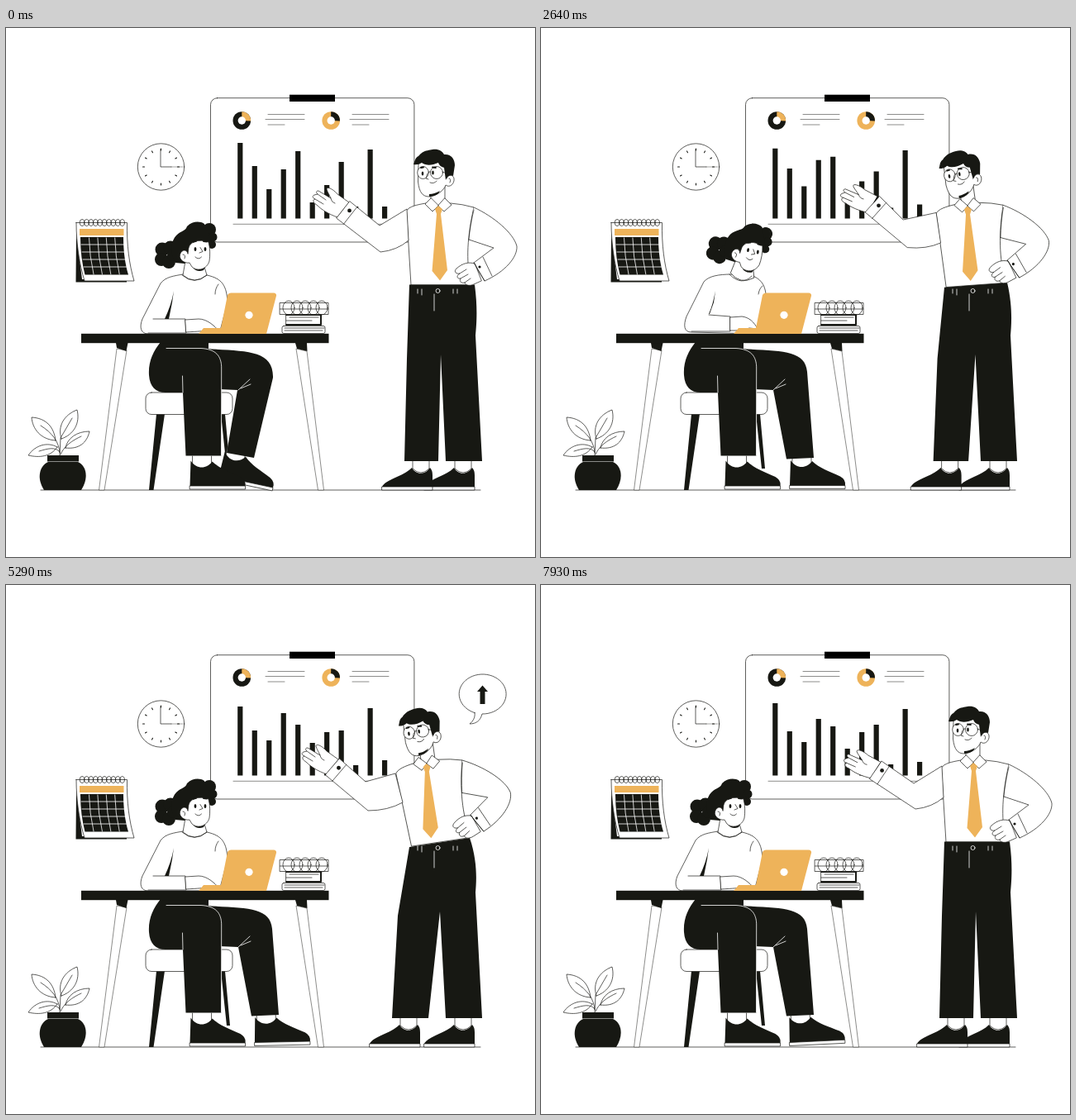
Recreate the animation shown at these times as an HTML page. Size 640 by 640 pixels, loop 8 s.

```html
<!DOCTYPE html>
<html lang="en">
<head>
<meta charset="utf-8">
<title>Office presentation</title>
<style>
html, body { margin: 0; height: 100%; overflow: hidden; background: #fff; }
svg { display: block; width: 100vw; height: 100vh; }
.line { fill: none; stroke: #1a1b17; stroke-width: .7; stroke-linejoin: round; stroke-linecap: round; }
.paper { fill: #fff; stroke: #1a1b17; stroke-width: .7; stroke-linejoin: round; stroke-linecap: round; }
.faint { fill: #fff; stroke: #1a1b17; stroke-width: .5; }
.ink { fill: #171813; }
.pure { fill: #000; }
.gold { fill: #eeb35a; }
.chalk { fill: none; stroke: #fff; stroke-width: .8; stroke-linecap: round; }
.brow { fill: none; stroke: #171813; stroke-width: 1.8; stroke-linecap: round; }
</style>
</head>
<body>
<svg id="stage" viewBox="0 0 640 640"></svg>
<script>
const LOOP = 8000;
const KEY_TIMES = [0, 2000, 3210, 4290, 5290, 6500, 7930];
const stage = document.getElementById('stage');

// Markup helpers
const path = (cls, d, id = '') => `<path class="${cls}" d="${d}"${id && ` id="${id}"`}/>`;
const disc = (cls, x, y, rx, ry = rx) => `<ellipse class="${cls}" cx="${x}" cy="${y}" rx="${rx}" ry="${ry}"/>`;
const box = (cls, x, y, w, h, r = 0) => `<rect class="${cls}" x="${x}" y="${y}" width="${w}" height="${h}" rx="${r}"/>`;
const group = (id, content) => `<g id="${id}">${content}</g>`;
const repeat = (n, draw) => Array.from({ length: n }, (_, i) => draw(i)).join('');

function plant() {
  return path('paper', 'M60 499C42 498 32 485 31 471C48 472 58 482 60 499ZM67 497C62 482 70 468 86 462C90 478 82 492 67 497ZM62 507C50 500 35 505 27 517C40 520 54 519 62 507ZM72 508C74 496 86 488 101 488C98 502 88 510 72 508Z')
    + path('line', 'M65 517L66 496L80 472M65 514C64 500 56 490 42 481M65 513C60 506 50 509 40 512M66 516C70 506 80 499 91 494')
    + box('ink', 50, 517, 38, 7.5)
    + path('ink', 'M51 525C40 530 37 545 46 559H91C100 545 98 530 87 525Z');
}

function clock() {
  const tick = i => {
    const a = i * Math.PI / 6, x = Math.sin(a), y = Math.cos(a);
    return `M${187.5 + 20 * x} ${168 + 20 * y}L${187.5 + 22 * x} ${168 + 22 * y}`;
  };
  return disc('paper', 187.5, 168, 28.2)
    + `<path class="line" style="stroke-width:1.1" d="${repeat(12, tick)}"/>`
    + path('line', 'M187 147V168H200')
    + '<path class="line" style="stroke-width:.4" d="M200 168H214"/>';
}

function calendar() {
  return path('ink', 'M85 248L92 304L146 305.5V307.5H84.5Z')
    + path('paper', 'M85 235.5H146.5C146 262 149 286 155 306H95C89 286 85 262 85 235.5Z')
    + box('gold', 89, 243, 53.5, 8)
    + path('ink', 'M90 253H142C142 270 144 285 148 298.5H95.5C92 285 90 270 90 253Z')
    + path('chalk', repeat(4, i => `M${100.5 + i * 10.4} 254Q${101 + i * 10.4} 276 ${106 + i * 10.4} 298M${91 + i} ${262 + i * 9}H${143 + i}`))
    + repeat(10, i => disc('line', 92 + i * 5.4, 235.5, 2.8, 4));
}

function donut(x, base, slice) {
  return disc(base, x, 112, 10.8)
    + path(slice, `M${x} 112V101.2A10.8 10.8 0 0 1 ${x + 10.8} 112.6Z`)
    + `<circle cx="${x}" cy="112" r="4.7" fill="#fff"/>`;
}

function board() {
  const notes = x => `M${x + 3} 104.5H${x + 47}M${x} 110.5H${x + 47}M${x + 3} 117H${x + 23}`;
  return box('paper', 247.5, 84.7, 246.4, 174.3, 8)
    + box('pure', 343, 80.7, 55, 8.3)
    + donut(285.3, 'ink', 'gold') + donut(393.2, 'gold', 'ink')
    + `<path class="line" style="stroke-width:.5" d="${notes(314)}${notes(416)}M275 237.3H460"/>`
    + path('ink', '', 'bars');
}

function desk() {
  return path('faint', 'M134 388L112.5 559H119L146 390ZM351 388L377.5 559H384.5L364 391Z')
    + path('ink', 'M133 381H147.5L145.5 391L134 387ZM350 381H364L364.5 391L352 388Z')
    + box('ink', 91, 369.8, 299.5, 11.4);
}

function laptopAndBooks() {
  return path('gold', 'M233 370L239 363H260L268 323Q269 320.5 272 320.5H324Q327.5 321 327 324L315 370Z')
    + '<circle cx="294" cy="347.3" r="4.6" fill="#fff"/>'
    + box('paper', 334, 360.5, 52, 9, 2) + path('line', 'M337 363H385M337 366H383')
    + box('paper', 339, 346.5, 42.5, 12.5) + path('line', 'M343 350H378M339 354H370')
    + '<path class="line" style="stroke-width:2" d="M339 347H381V359H339"/>'
    + box('paper', 331.5, 332.5, 58.5, 14) + path('line', 'M331.5 340H390')
    + repeat(5, i => disc('line', 342 + i * 10, 338.5, 7, 8.5));
}

// Shoe whose toe tip touches the origin
const shoe = () => path('paper', 'M-64 -36V-26Q-53 -16 -41 -26V-36M-67 0H0V4H-67Z')
  + path('ink', 'M-66 -30.5C-59 -20 -47 -20 -40 -29.5C-31 -21 -19 -17 -6 -11Q1 -7 0 0H-67Z');

function girlHead() {
  const bun = [[189, 268, 8.5], [199, 266, 8.5], [188, 280, 8], [197, 283, 8], [202, 275, 7]];
  const curls = [[246, 244, 8], [250, 253, 5.5], [249, 262, 5]];
  return path('paper', 'M217 282L214 299Q228 311 243 299L240 289Z')
    + path('ink', 'M226 290Q233 295 241 289L239 293Q231 296 226 290Z')
    + [...bun, ...curls].map(c => disc('ink', ...c)).join('')
    + path('ink', 'M205 284C198 274 199 258 206 251C212 245 217 246 219 240C225 234 234 233 240 237L250 262L216 285Z')
    + path('paper', 'M221 266C223 258 233 255 245 259C247 266 247 276 246 282C243 292 232 295 225 289L222 284C217 285 209 281 210.5 274C213 267 219 268 220 273Z')
    + path('brow', 'M226.5 259L230 258M239 258L243 258.5')
    + disc('ink', 229, 267.5, 1.4, 2.5) + disc('ink', 241, 267.5, 1.4, 2.5)
    + path('line', 'M235 265.5L238 270.5L234 272M229 277Q233 281 236.5 277M214 274Q218 274 216 279');
}

function girl() {
  return path('ink', 'M182 467H192L178.5 559H173ZM260 467H265L271 533H267Z')
    + box('paper', 169, 441, 105, 26.5, 7)
    + group('swingShoe', shoe()) + path('ink', '', 'swingLeg')
    + path('chalk', 'M281 438L295 425M284 436L296 431')
    + `<g transform="translate(289.5 554)">${shoe()}</g>`
    + path('ink', 'M187 380C178 391 172 404 173 420C174 434 181 441 193 441H214L217.5 517.5H260.5L261 410L245 388V380Z')
    + path('chalk', 'M194 387.5H236C253 388.5 261 396 260.7 412L260.5 517M213.5 421L214 441')
    + path('paper', '', 'blouse')
    + group('girlHead', girlHead())
    + path('line', '', 'collarLine') + path('ink', '', 'sleeveGap')
    + path('paper', '', 'forearm') + path('paper', '', 'typingHand');
}

function manHead() {
  return path('paper', 'M514 198L514 214L523 218L531 208V188Z')
    + path('paper', 'M499 162L498.5 186C500 199 504 204 512 204C522 203 530 196 532 190C537 194 543 188 542 182C541 177 535 177 533 182L531 162Z')
    + path('ink', 'M512 204Q523 203 525 197Q518 201 512 201Z')
    + path('ink', 'M493 165C495 160 495 157 499 155C503 150 508 148 516 147C523 146 528 149 530 153C538 152 543 158 543 166L541 179C537 177 534 179 532 184L530 169C526 168 524 166 523 163C516 166 508 167 503 163Q499 166 493 165Z')
    + disc('paper', 504.5, 175, 6.8, 7.5) + disc('paper', 521, 175, 7.5)
    + disc('ink', 504, 176, 1.3, 2.5) + disc('ink', 516.5, 175, 1.3, 2.5)
    + path('line', 'M511.3 174L513.5 174M528 174L533 176M510 176L508 182L511 183M513 187Q518 189 521 185M536 182Q539 182 537 187')
    + path('brow', 'M502 169L505 168.5M516 168.5L520 169');
}

function man() {
  return `<g transform="translate(567 555)">${manShoe()}</g>` + group('stepShoe', manShoe())
    + group('torso', path('paper', 'M508 212C496 214 488 216 484.5 221L490 311H562C558 285 556 262 566 217Q552 213 538 212Z'))
    + path('ink', '', 'trousers')
    + path('chalk', 'M518 322V342')
    + group('beltDetail', path('chalk', 'M498 316V321M503 316V323M541 316V321M546 316V321') + disc('chalk', 522.5, 318, 2.5))
    + group('hipArm',
      path('paper', 'M566 217C590 228 614 248 618 264C619 277 604 295 579 306L566 284L590 266L560 256')
      + path('paper', 'M567 285C560 283 553 284 545 291C541 295 545 298 549 297C544 300 546 304 550 303C548 307 551 309 555 308C556 312 562 312 566 310L575 306Z')
      + path('line', 'M566 220C563 232 561 244 560 256M549 297L557 292M550 303L559 298M555 308L562 303M566 284L579 306M577 277L588 300')
      + disc('ink', 573, 289, 1.6))
    + group('manHead', manHead())
    + group('collar', path('paper', 'M514 206L507 213L516 222L523 215ZM531 206L539 214L530 222L523 215Z'))
    + group('tie', path('gold', 'M523 215L519 219L521 225L515.5 294L525 305.5L534 293L526 225L528 219Z'))
    + group('pointingHand', path('paper', 'M7 -9L-7 -19C-12 -25 -20 -29 -20 -25C-19 -21 -17 -19 -15 -14L-30 -23C-33 -23 -33 -21 -31 -19L-35 -18C-38 -17 -37 -14 -34 -13C-38 -12 -36 -8 -32 -6C-26 0 -18 5 -7 9Z')
      + path('line', 'M-31 -19L-21 -12M-34 -13L-24 -7M-15 -14Q-14 -9 -10 -8'))
    + path('paper', '', 'pointingArm')
    + '<circle id="cuffButton" class="ink" r="2.4"/>';
}

function manShoe() {
  return path('paper', 'M-24 -32V-22Q-14 -12 -4 -22V-32M-61 0H0V4H-61Z')
    + path('ink', 'M-61 0C-57 -9 -36 -12 -25 -23C-20 -14 -9 -14 -3 -23Q0 -20 0 -14V0Z');
}

const bubble = () => path('paper', 'M6 -13.4A28.5 24 0 1 1 15 -12C13 -4 8 0 0 0C4 -3 7 -8 6 -13.4Z')
  + path('ink', 'M15.5 -46.5L22 -39H18.5V-24H12.5V-39H9Z');

stage.innerHTML = path('line', 'M42 559H574') + plant() + clock() + calendar() + board()
  + girl() + desk() + laptopAndBooks() + man() + group('bubble', bubble());

const parts = {};
stage.querySelectorAll('[id]').forEach(el => parts[el.id] = el);

// Motion helpers
const ease = (t, from, to) => {
  const x = Math.min(1, Math.max(0, (t - from) / (to - from)));
  return x * x * (3 - 2 * x);
};

// Blends two paths that share the same commands
const blend = (a, b, k) => {
  const ends = b.match(/-?[\d.]+/g);
  let i = 0;
  return a.replace(/-?[\d.]+/g, n => (+n + (ends[i++] - n) * k).toFixed(2));
};

// Smooth cubic curve through keyed values
function curve(times, values, t) {
  const last = times.length - 1;
  if (t >= times[last]) return values[last];
  const i = times.findIndex(x => x > t) - 1;
  if (i < 0) return values[0];
  const span = times[i + 1] - times[i], x = (t - times[i]) / span;
  const slope = j => j <= 0 || j >= last ? 0 : (values[j + 1] - values[j - 1]) / (times[j + 1] - times[j - 1]) * span;
  const x2 = x * x, x3 = x2 * x;
  return (2 * x3 - 3 * x2 + 1) * values[i] + (x3 - 2 * x2 + x) * slope(i)
    + (3 * x2 - 2 * x3) * values[i + 1] + (x3 - x2) * slope(i + 1);
}

const setPath = (id, d) => parts[id].setAttribute('d', d);
const move = (id, transform) => parts[id].setAttribute('transform', transform);

// Bar tops at each key time
const BAR_TOPS = [
  [139, 144, 147, 147, 147, 145, 143], [167, 169, 171, 173, 176, 177, 177],
  [195, 193, 190, 189, 188, 188, 190], [171, 163, 157, 155, 155, 158, 162],
  [149, 153, 159, 165, 169, 173, 171], [211, 205, 199, 193, 191, 192, 198],
  [190, 187, 184, 180, 178, 176, 178], [162, 170, 176, 176, 176, 172, 169],
  [216, 217, 218, 218, 218, 218, 217], [147, 148, 148, 149, 149, 150, 150],
  [216, 214, 213, 212, 212, 213, 214]
];

// Pointing arm: cuff x, y, hand angle, elbow x, y, crook x, y
const ARM = [
  [408, 404, 398, 393, 395, 393, 405], [220, 211, 217, 221, 220, 224, 224],
  [0, -11, -4, -3, 0, -10, -7],
  [453, 449, 438, 437, 438, 443, 453], [271, 260, 272, 274, 273, 269, 271],
  [452, 440, 437, 434, 435, 434, 451], [239, 228, 237, 239, 238, 236, 240]
];

// Girl's head: shift x, y, tilt
const HEAD_TIMES = [0, 1000, 2000, 3210, 4290, 5290, 6500, 7930];
const HEAD = [[0, 14, 18, 16, 5, 0, -1, 0], [0, 0, 1, 0, 0, 0, 0, 0], [0, 10, 18, 5, -1, 0, -2, 0]];

function drawBars(t) {
  setPath('bars', BAR_TOPS.map((tops, i) =>
    `M${280.2 + i * 17.48} 230.5V${curve(KEY_TIMES, tops, t)}h6.2V230.5Z`).join(''));
}

function drawGirl(t) {
  const lean = ease(t, 0, 1100) - ease(t, 3500, 4700);
  const swing = ease(t, 0, 1500);
  const tap = t > 5200 ? 3 * Math.sin(Math.PI * (t - 5200) / 414) ** 2 : 0;
  setPath('blouse', blend(
    'M214 298C203 300 193 301 187 309L165 352C161 362 163 370 172 370L258 370L268 332C267 312 262 303 243 299Z',
    'M230 298C215 298 203 300 197 307L176 349C172 360 173 368 182 368L262 370L272 322C271 311 266 303 254 299Z', lean));
  setPath('collarLine', blend('M213 299Q228 312 243 299M257 310Q253 315 253 322', 'M228 298Q243 313 255 300M268 312Q264 315 263 322', lean));
  setPath('sleeveGap', blend('M203 318C201 330 197 341 192 352L197 352L201 332Z', 'M211 318C209 328 207 337 203 346L204 346L209 332Z', lean));
  setPath('forearm', blend('M178 352L217 352L218 369L172 369', 'M203 347L229 349L229 367L182 367', lean));
  setPath('typingHand', blend('M217 353L233 352C243 352 252 360 258 367L246 365C240 367 232 367 218 368Z',
    'M229 350L243 349C252 350 258 356 262 364L252 363C244 366 238 366 229 366Z', lean));
  const [x, y, tilt] = HEAD.map(values => curve(HEAD_TIMES, values, t));
  move('girlHead', `translate(${x} ${y}) rotate(${tilt} 228 285)`);
  setPath('swingLeg', blend('M243 388C290 391 324 389 323 423L300 520L267 514L280 438L258 437Z',
    'M243 388C290 391 320 389 322 416L330 520L297 521.5L281 438L258 437Z', swing));
  move('swingShoe', `translate(${323 + 45 * swing} ${556 - 2.5 * swing}) rotate(${12 * (1 - swing)}) rotate(${-tap} -67 4)`);
}

function drawMan(t) {
  const bend = ease(t, 1800, 3500) - ease(t, 6000, 7650);
  const nod = ease(t, 0, 1900) - ease(t, 6000, 7650);
  const turn = `rotate(${-8.5 * bend} 525 310)`;
  ['torso', 'hipArm', 'collar'].forEach(id => move(id, turn));
  move('manHead', `translate(${-13 * bend} ${bend}) rotate(${-8 * nod} 523 203)`);
  move('tie', `translate(${-14.5 * bend} ${bend}) rotate(${-2.5 * bend} 523 217)`);
  move('stepShoe', `translate(${516 - 15 * bend} 555)`);
  setPath('trousers', blend('M488 310.5L567 310.5C571 340 569 360 568 372L576 524L532 524L526 395L523 524L482 524L485 400Z',
    'M488 317L561 306C571 335 569 360 568 372L576 524L532 524L525 395L511 524L467 524L474 400Z', bend));

  const [cx, cy, angle, ex, ey, bx, by] = ARM.map(values => curve(KEY_TIMES, values, t));
  let dx = (ex + bx) / 2 - cx, dy = (ey + by) / 2 - cy;
  const length = Math.hypot(dx, dy);
  dx /= length; dy /= length;
  const nx = 13 * dy, ny = -13 * dx;
  const sx = 485 - 14 * bend, sy = 219 + 9 * bend, px = 487 - 7 * bend, py = 257 + 6 * bend;
  const ix = cx + 11 * dx, iy = cy + 11 * dy;
  setPath('pointingArm', `M${cx + nx} ${cy + ny}L${bx} ${by}Q${(bx + sx) / 2} ${(by + sy) / 2} ${sx} ${sy}L${px} ${py}`
    + `Q${(ex + px) / 2 + 3} ${(ey + py) / 2 + 5} ${ex} ${ey}L${cx - nx} ${cy - ny}ZM${ix + nx} ${iy + ny}L${ix - nx} ${iy - ny}`);
  move('pointingHand', `translate(${cx} ${cy}) rotate(${angle})`);
  move('cuffButton', `translate(${cx + 6.5 * dx + nx * .3} ${cy + 6.5 * dy + ny * .3})`);
}

function drawBubble(t) {
  const size = ease(t, 3750, 4200) - ease(t, 6900, 7250);
  const y = curve([3700, 4290, 5290, 6000, 6500, 6860, 7300], [190, 183, 168, 158, 151, 147, 146], t);
  move('bubble', `translate(561 ${y}) rotate(${8 * (1 - ease(t, 4200, 5100))}) scale(${size})`);
}

function render() {
  const t = performance.now() % LOOP;
  drawBars(t);
  drawGirl(t);
  drawMan(t);
  drawBubble(t);
  requestAnimationFrame(render);
}
render();
</script>
</body>
</html>
```
